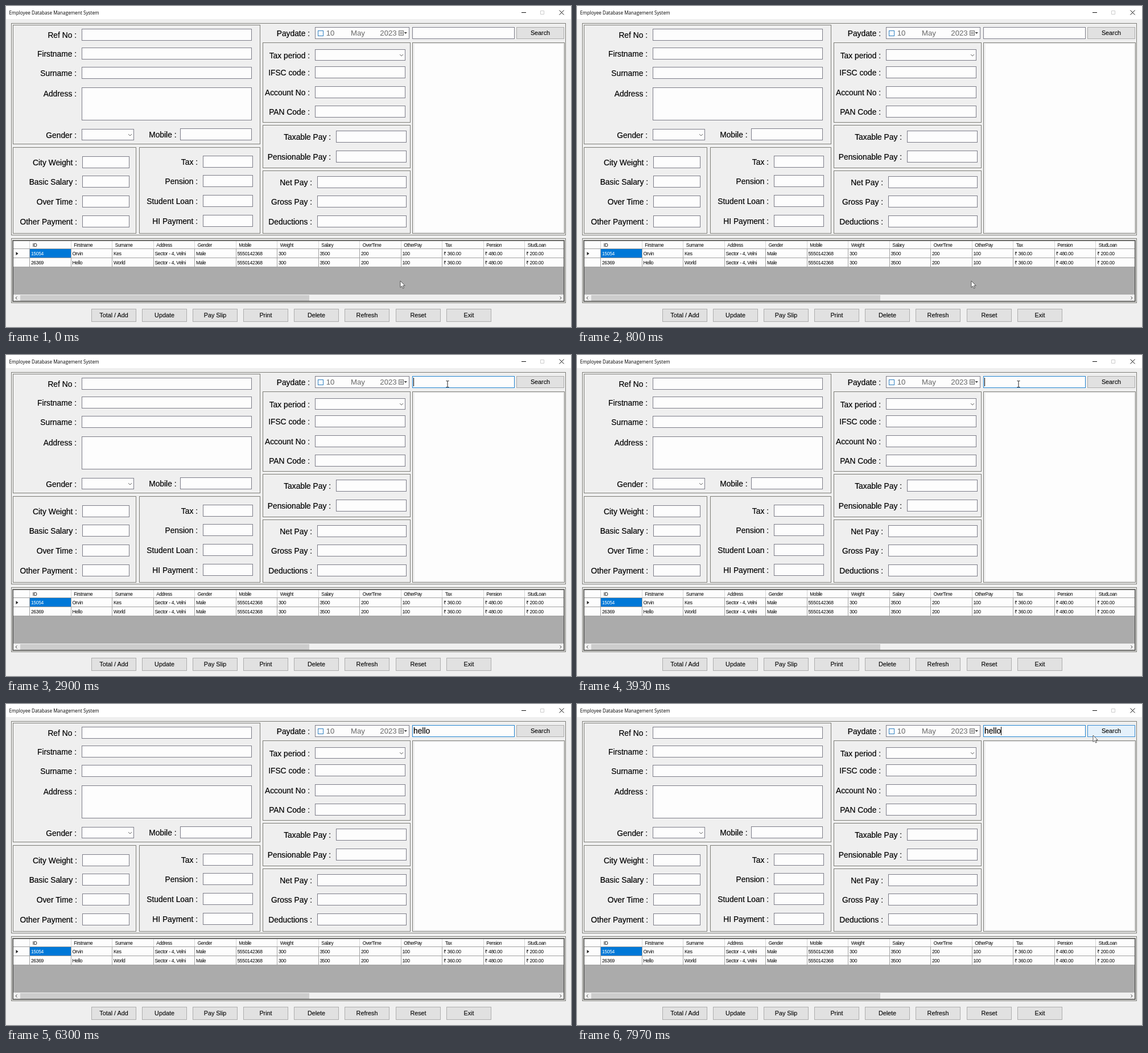
Write an HTML page that moves like this. It is 993 px wide and 564 px high and loops after 8000 ms.

```html
<!DOCTYPE html>
<html lang="en">
<head>
<meta charset="utf-8">
<title>Employee Database</title>
<style>
  html, body { margin: 0; width: 100%; height: 100%; overflow: hidden; background: #efefef; }
  svg { display: block; width: 100vw; height: 100vh; font-family: "Liberation Sans", Arial, sans-serif; }
  text { white-space: pre; }
  .title { font: 8.2px "Open Sans", "Noto Sans", sans-serif; }
  .label, .query { font-size: 13.8px; stroke: #000; stroke-width: .2px; }
  .label { text-anchor: end; }
  .date { font-size: 13.2px; fill: #686868; text-anchor: middle; }
  .button { font-size: 10.8px; text-anchor: middle; stroke: #000; stroke-width: .1px; }
  .head { font-size: 8.3px; letter-spacing: -.45px; }
  .cell { font-size: 8.6px; letter-spacing: -.35px; }
</style>
</head>
<body>
<svg id="stage" viewBox="0 0 993 564" preserveAspectRatio="none">
  <g id="form"></g>
  <text id="query" class="query" x="716" y="52"></text>
  <path id="caret" d="M.5 40V55" stroke="#000"/>
  <path id="arrow" d="M0 0V11.5L2.7 9 4.6 13.2 6.4 12.4 4.6 8.3H8.2Z" fill="#fff" stroke="#333" stroke-width=".8"/>
  <path id="beam" d="M-2.5 -5.5H-.7L0 -5 .7 -5.5H2.5M0 -5V5M-2.5 5.5H-.7L0 5 .7 5.5H2.5" fill="none" stroke="#222"/>
</svg>
<script>
const $ = id => document.getElementById(id);
const parts = [];
const FIELD = '#fdfdfd', EDGE = '#7c7c88', PANEL = '#7d7d77', GRID = '#a0a0a0';

function box(x1, y1, x2, y2, fill = FIELD, stroke = EDGE, id = '') {
  parts.push(`<rect id="${id}" x="${x1 + .5}" y="${y1 + .5}" width="${x2 - x1 - 1}" height="${y2 - y1 - 1}" fill="${fill}" stroke="${stroke}"/>`);
}
function area(x1, y1, x2, y2, color) {
  parts.push(`<rect x="${x1}" y="${y1}" width="${x2 - x1}" height="${y2 - y1}" fill="${color}"/>`);
}
function text(cls, x, y, value, color = '#000') {
  parts.push(`<text class="${cls}" x="${x}" y="${y}" style="fill:${color}">${value}</text>`);
}
function path(d, stroke, fill = 'none') {
  parts.push(`<path d="${d}" stroke="${stroke}" fill="${fill}"/>`);
}
function button(x, y, w, h, value, id) {
  box(x, y, x + w, y + h, '#e1e1e1', '#adadad', id);
  text('button', x + w / 2, y + h / 2 + 3.9, value);
}
function panel([x1, x2], y1, y2) {
  box(x1, y1, x2, y2, 'none', PANEL);
}
// Evenly spaced labelled fields; labels end just before the field
function fields(names, x1, x2, top, step = 0, h = 21, gap = 9) {
  names.split(',').forEach((name, i) => {
    const y = Math.floor(top + step * i);
    box(x1, y, x2, y + h);
    text('label', x1 - gap, y + 15.8, name + ' :');
  });
}
function combo(name, x1, x2, y) {
  fields(name, x1, x2, y, 0, 20);
  path(`M${x2 - 10} ${y + 9}l3 3 3 -3`, '#666');
}

// Title bar
area(0, 0, 993, 23, '#fff');
text('title', 5.5, 14.6, 'Employee Database Management System');
path('M906 11.5h8', '#111');
path('M939.5 8.5h6v6h-6z', '#ccc');
path('M972.5 7.5l8 8m0 -8l-8 8', '#111');

// Panels
const OUTER = [9, 984], LEFT = [12, 447], MIDDLE = [451, 711], RIGHT = [714, 982];
const BOTTOM = 400, ROW = 34.7;
panel(OUTER, 30, 403);
panel(OUTER, 408, 522);
panel(RIGHT, 64, BOTTOM);
area(718, 67, 979, 397, FIELD);

panel(LEFT, 33, 243);
fields('Ref No,Firstname,Surname', 133, 432, 40, 33.5);
fields('Address', 133, 432, 143, 0, 58);
combo('Gender', 133, 225, 216);
fields('Mobile', 306, 432, 215, 0, 21, 6.5);

panel([LEFT[0], 229], 248, BOTTOM);
fields('City Weight,Basic Salary,Over Time,Other Payment', 134, 217, 264, ROW);
panel([234, LEFT[1]], 248, BOTTOM);
fields('Tax,Pension,Student Loan,HI Payment', 346, 434, 263, ROW);

fields('Paydate', 543, 709, 37);
panel(MIDDLE, 64, 205);
combo('Tax period', 543, 702, 76);
fields('IFSC code,Account No,PAN Code', 543, 702, 106.5, ROW);
panel(MIDDLE, 209, 285);
fields('Taxable Pay,Pensionable Pay', 580, 704, 219, ROW + .3);
panel(MIDDLE, 289, BOTTOM);
fields('Net Pay,Gross Pay,Deductions', 547, 704, 299, ROW);

// Date picker
box(548, 43, 558, 53, FIELD, '#2d7fc1');
['10', 'May', '2023'].forEach((part, i) => text('date', 570 + 46 * i + 2.5 * i * i, 52.3, part, '#686868'));
box(690, 43, 699, 52, '#e4e4e4', '#777');
path('M692 46.5h5M692 48.5h5', '#888');
path('M699.5 46h5.5l-2.75 3z', 'none', '#444');

// Data grid
const heads = ['ID', 'Firstname', 'Surname', 'Address', 'Gender', 'Mobile', 'Weight', 'Salary',
  'OverTime', 'OtherPay', 'Tax', 'Pension', 'StudLoan'];
const shared = ['Sector - 4, Velni', 'Male', '5550142368', '300', '3500', '200', '100',
  '₹ 360.00', '₹ 480.00', '₹ 200.00'];
const rows = [['15054', 'Orvin', 'Kes', ...shared], ['26369', 'Hello', 'World', ...shared]];
box(11, 411, 982, 520, '#ababab', PANEL);
box(12, 412, 981, 519, '#ababab', '#555');
area(13, 413, 980, 459, FIELD);
area(42, 427, 114, 443, '#0078d7');
heads.forEach((name, i) => {
  const x = 41.5 + 72.5 * i, edge = Math.floor(x) + .5;
  path(`M${edge} 413V427`, '#d4d4d4');
  path(`M${edge} 427V459`, GRID);
  text('head', x + 5.3, 422.9, name);
  rows.forEach((row, r) => text('cell', x + 2.4, 438 + 16 * r, row[i], i + r ? '#000' : '#fff'));
});
for (let y = 426.5; y < 459; y += 16) path(`M13 ${y}H980`, GRID);
path('M17.5 432v6l4 -3z', 'none', '#222');
area(13, 507, 980, 518, '#f0f0f0');
area(25, 508, 533, 518, '#cdcdcd');
path('M19.5 510.5l-2.5 2.5 2.5 2.5M973.5 510.5l2.5 2.5 -2.5 2.5', '#444');

// Search and buttons
box(714, 37, 894, 58, FIELD, EDGE, 'search');
button(897, 37, 84, 21, 'Search', 'go');
['Total / Add', 'Update', 'Pay Slip', 'Print', 'Delete', 'Refresh', 'Reset', 'Exit']
  .forEach((name, i) => button(150 + 89 * i + (i > 5), 532, 79, 23, name));
$('form').innerHTML = parts.join('');

// Animation
const LOOP = 8000, FOCUS = 2750, BLINK = 530;
const WORD = 'hello', TYPE_START = 4700, KEY_GAP = 225, LEAVE = 7050;
const inside = (x, y, x1, y1, x2, y2) => x >= x1 && x < x2 && y >= y1 && y < y2;
const show = (id, on) => $(id).setAttribute('visibility', on ? 'visible' : 'hidden');
const move = (id, x, y = 0) => $(id).setAttribute('transform', `translate(${x} ${y})`);
function paint(id, fill, stroke) {
  $(id).setAttribute('fill', fill);
  $(id).setAttribute('stroke', stroke);
}
function glide(t, from, to) {
  const u = Math.min(1, Math.max(0, (t - from) / (to - from)));
  return u * u * (3 - 2 * u);
}

function draw(t) {
  const typed = Math.max(0, Math.min(WORD.length, Math.floor((t - TYPE_START) / KEY_GAP) + 1));
  const lastInput = typed ? TYPE_START + KEY_GAP * (typed - 1) : FOCUS;
  const focused = t >= FOCUS;
  $('query').textContent = WORD.slice(0, typed);
  move('caret', Math.round(716 + $('query').getComputedTextLength()));
  show('caret', focused && (t - lastInput) % (2 * BLINK) < BLINK);
  paint('search', FIELD, focused ? '#1f82cf' : EDGE);

  const rise = glide(t, 1300, 2020), settle = glide(t, 2150, 2550), leave = glide(t, LEAVE, 7850);
  const x = 693 + 78 * rise + 5 * settle + 131 * leave;
  const y = 483 - 408 * rise - 24 * settle + 4 * leave;
  const visible = t < TYPE_START || t >= LEAVE;
  const overText = inside(x, y, 718, 67, 979, 397) || inside(x, y, 714, 37, 894, 58);
  const overGo = inside(x, y, 897, 37, 981, 58);
  move('arrow', x, y);
  move('beam', x, y);
  show('arrow', visible && !overText);
  show('beam', visible && overText);
  paint('go', overGo ? '#e5f1fb' : '#e1e1e1', overGo ? '#3a8fd6' : '#adadad');
}

const start = performance.now();
function tick() {
  draw((performance.now() - start) % LOOP);
  requestAnimationFrame(tick);
}
tick();
</script>
</body>
</html>
```
